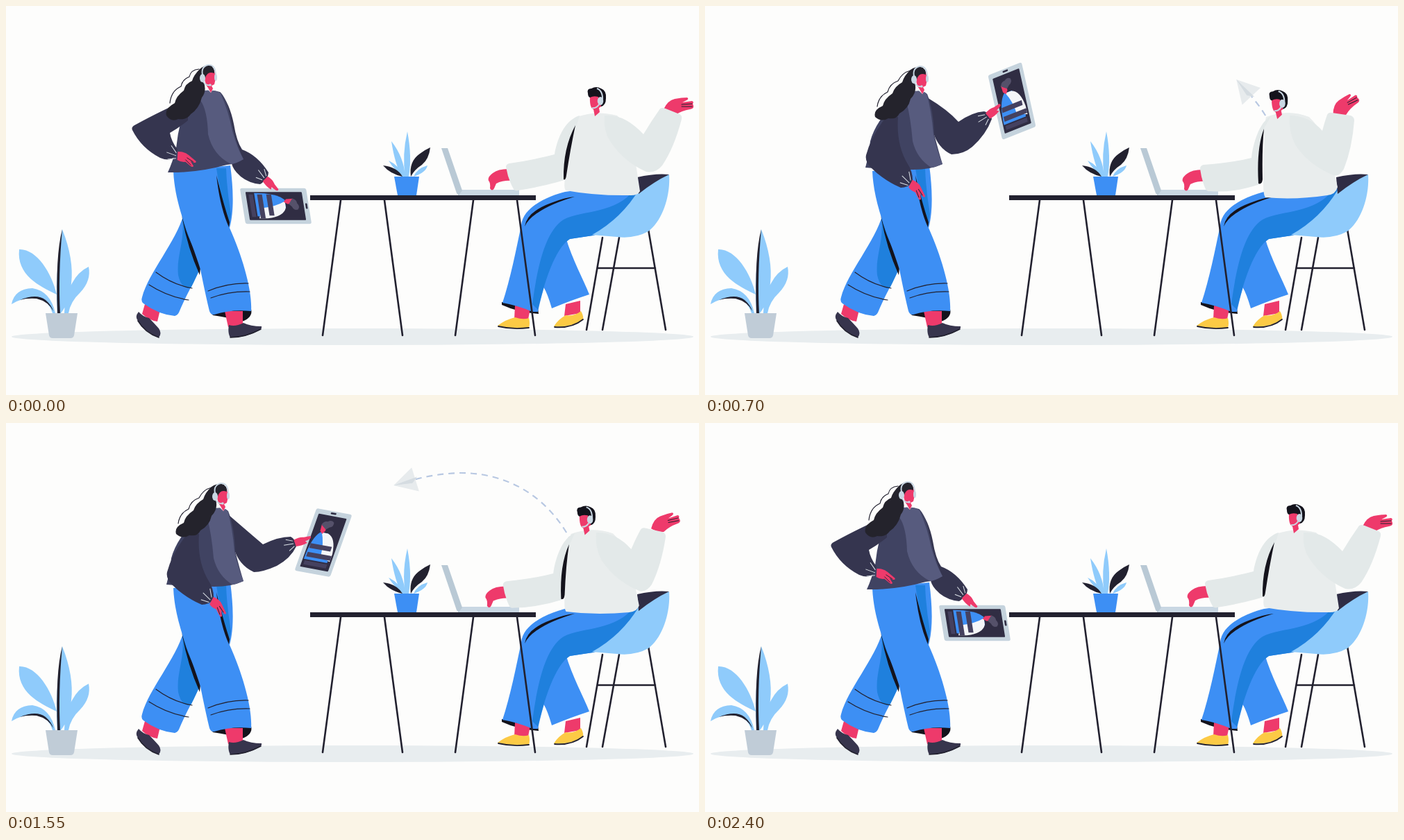
Animation of 998 by 561 pixels, one loop 2.45 s. Source, as an HTML page:

```html
<!DOCTYPE html>
<html lang="en">
<head>
<meta charset="utf-8">
<title>Sending a message</title>
<style>
  html, body { margin: 0; width: 100%; height: 100%; overflow: hidden; background: #fdfdfc; }
  svg { display: block; width: 100vw; height: 100vh; }
  .line { fill: none; stroke: #22212f; stroke-linecap: round; }
  .skin { fill: #ee3a6b; }
  .blue { fill: #3d8ff4; }
  .shade { fill: #1f80dd; }
  .leaf { fill: #8fcbfb; }
  .ink { fill: #22212f; }
  .black { fill: #14131c; }
  .knit { fill: #35354f; }
  .sleeve { fill: #e3e9e9; }
  .set { fill: #c9d7e3; }
  .wire { fill: none; stroke: #c9d7e3; }
  .pleat { fill: none; stroke: #dfe5ea; }
</style>
</head>
<body>
<svg viewBox="0 0 998 561">
  <defs><clipPath id="reveal"><rect id="flown" y="0" width="998" height="561"/></clipPath></defs>
  <ellipse cx="499" cy="477" rx="491" ry="12" fill="#e8edef"/>

  <g id="floorPlant">
    <path class="leaf" d="M81 322Q98 365 94 400Q91 428 79 443H74Q71 400 76 360Q78 338 81 322M19 351C44 350 66 385 73 416C48 404 15 388 19 351M8 430Q12 408 38 407Q64 411 71 443H67Q60 422 42 420Q22 421 8 430M119 376Q123 396 107 413Q93 426 90 443H84Q84 418 95 400Q104 383 119 376"/>
    <path class="ink" d="M81 322Q71 360 74 443H78Q75 390 81 322M20 424Q44 414 57 424Q66 432 68 440Q61 426 44 422Q30 421 20 424"/>
    <path fill="#c0ccd7" d="M57 443H103L98 475Q97 479 93 479H67Q63 479 62 475Z"/>
  </g>

  <g id="deskPlant">
    <path class="leaf" d="M578 181Q585 218 580 246H575Q570 215 578 181M555 195Q573 218 575 246H570Q560 228 555 195M607 230Q605 240 587 246Q592 234 607 230M551 223Q565 229 573 246Q560 238 551 223"/>
    <path class="ink" d="M611 204Q609 221 599 229Q588 236 583 246Q580 224 596 213Q604 207 611 204M543 230Q563 232 571 246Q553 242 543 230"/>
    <path class="blue" d="M559 246H595L591 273H564Z"/>
  </g>

  <g opacity="0" id="flight">
    <path id="trail" clip-path="url(#reveal)" fill="none" stroke="#b8c8e2" stroke-width="2.1" stroke-dasharray="9 7"
      d="M815 172C775 95 710 72 655 72C610 73 575 84 545 98C510 115 490 140 475 165"/>
    <g id="plane">
      <path fill="#e7ebed" d="M-32 0L0 -18L1 18Z"/>
      <path fill="#d5dce1" d="M-32 0L4 -3L-5 4Z"/>
    </g>
  </g>

  <g id="seated">
    <path class="line" stroke-width="2.6" d="M859 334L836 467M883 334L859 467M925 322L950 467M852 378H935"/>
    <path class="black" d="M714 427Q740 430 766 436L767 444Q738 442 714 431Z"/>
    <path class="skin" d="M733 432L755 436L752 452H732ZM806 430L827 425V443L804 447Z"/>
    <path fill="#fcca45" d="M708 461Q720 452 733 449Q745 453 753 450Q755 458 753 464Q730 466 708 461M789 462Q795 452 806 446Q818 448 828 440Q832 447 831 452Q815 464 789 462"/>
    <path class="line" stroke-width="1.8" d="M709 462Q730 467 753 464M790 463Q815 465 831 452"/>
    <path class="blue" d="M806 333C815 365 832 395 840 416Q815 424 786 436Q780 415 774 405Q785 360 806 333"/>
    <path class="blue" d="M805 268C785 273 745 288 742 316C735 350 726 395 715 428Q738 432 758 441L766 441C775 400 790 350 812 336L845 331C880 325 905 290 914 262L880 258Z"/>
    <path class="shade" d="M905 264C880 300 830 294 803 308C778 324 766 370 758 430L766 438C775 400 790 350 812 336L845 331C880 322 900 295 914 266Z"/>
    <path class="black" d="M747 318Q750 297 785 284Q805 276 819 275Q785 285 766 298Q752 307 747 318"/>
    <path class="leaf" d="M955 243C957 275 945 310 925 325Q905 336 880 333L844 330Q887 306 912 264Q930 252 955 243"/>
    <path fill="#2f2d45" d="M909 247Q935 241 955 243Q935 252 911 271Z"/>
  </g>

  <path class="set" d="M649 265H739V273H651Z"/>
  <path fill="#b9c9d5" d="M627 205H636L657 266L652 273L649 270Z"/>
  <path class="ink" d="M438 273H763V280H438Z"/>
  <path class="line" stroke-width="2.6" d="M482 280L456 475M545 280L571 475M673 280L647 475M736 280L762 475"/>

  <g id="speaker">
    <g id="typingHand"><path class="skin" d="M724 235Q708 235 701 241Q693 247 695 252Q698 255 697 263Q700 268 703 263L706 256Q716 251 730 252Z"/></g>
    <g id="openHand">
      <path class="skin" d="M-8 -3Q-2 -16 8 -18Q18 -20 26 -20Q29 -18 25 -16L19 -13L33 -15Q36 -14 34 -11L35 -8Q36 -4 30 -3Q18 -1 9 5Q0 4 -8 -3"/>
      <path class="line" stroke-width="1" d="M18 -10L33 -11M18 -7L33 -7"/>
    </g>
    <path fill="#e9eded" id="shirt"/>
    <path class="sleeve" id="typingArm"/>
    <path class="sleeve" id="openArm"/>
    <path class="black" id="fold"/>
    <g id="speakerHead">
      <path class="skin" d="M841 129Q848 126 858 130L857 145L854 147L855 153L848 159L846 149Q840 147 841 129"/>
      <path class="black" d="M838 126Q836 119 843 119Q850 115 857 119Q865 122 864 133Q864 143 857 145L853 131Q846 129 841 132Q838 131 838 126"/>
      <path class="wire" stroke-width="2" d="M851 119Q860 122 859 137M854 142Q850 148 844 147"/>
      <ellipse class="set" cx="856" cy="137" rx="4.3" ry="6"/>
    </g>
  </g>

  <g id="walker">
    <path class="black" d="M294 441L353 437Q356 449 340 455Q320 449 298 446Z"/>
    <path class="skin" d="M200 430L222 438L218 455Q205 453 196 444ZM315 440H341V461L320 463Z"/>
    <path fill="#37354d" d="M191 441Q185 448 190 454Q200 470 220 478Q225 472 220 465Q212 456 206 450Q197 448 191 441M321 460Q319 472 323 478Q345 478 362 469Q369 466 368 462Q352 462 342 457Q330 463 321 460"/>
    <path class="line" stroke-width="1.6" d="M190 454Q200 471 220 478M323 478Q345 478 367 466"/>
    <path class="blue" d="M256 300C245 340 205 385 196 420Q194 426 198 429Q220 445 243 447Q247 446 249 442C262 410 285 375 300 330Z"/>
    <path class="shade" d="M254 305C258 340 245 360 248 388Q252 408 266 407Q276 388 281 372Z"/>
    <path class="black" d="M253 301Q262 340 281 366L279 388Q260 345 253 301"/>
    <path class="blue" d="M241 238C243 290 268 340 280 380Q288 420 293 440Q295 446 300 445Q325 437 353 440C355 410 340 360 322 320C329 295 327 260 323 230Z"/>
    <path class="shade" d="M303 234H317Q318 265 324 300L321 318Q310 280 303 234"/>
    <path class="black" d="M303 244Q308 290 321 319L322 312Q313 285 303 244"/>
    <path class="line" stroke-width="1.2" d="M216 384Q240 402 268 407M206 402Q232 419 263 424M291 411Q320 399 349 400M295 421Q322 411 351 412"/>
    <path class="knit" id="frontArm"/>
    <path fill="#404362" id="sweater"/>
    <path fill="#575b7e" id="panel"/>
    <path class="knit" id="backArm"/>
    <g id="backHand">
      <path class="skin" d="M0 -6Q10 -7 16 -2L27 6Q28 9 24 8L19 6L24 13Q23 16 19 13L12 8Q5 9 0 6Z"/>
      <path class="line" stroke-width=".9" d="M14 2L23 7M12 5L20 12"/>
      <path class="pleat" d="M-2 -4L-10 -14M-2 0L-16 -4M-2 4L-14 6"/>
    </g>
    <path fill="#24232c" id="hair"/>
    <path class="line" stroke-width="1.2" id="strand"/>
    <g id="walkerHead">
      <path fill="#f5f6f7" d="M287 117L299 119L295 125Z"/>
      <path class="skin" d="M287 95Q290 91 300 93Q303 104 300 113L296 115L298 119L295 125L291 118Q284 110 287 95"/>
      <path fill="#24232c" d="M281 99Q282 86 292 86Q301 88 300 97Q290 93 287 104Z"/>
      <path class="wire" stroke-width="2" d="M284 103Q279 88 291 85Q302 84 302 101M284 109Q288 115 293 114"/>
      <ellipse class="set" cx="283" cy="104" rx="4" ry="6"/>
      <ellipse class="set" cx="302" cy="103" rx="2" ry="5"/>
      <circle class="set" cx="294" cy="114" r="1.8"/>
    </g>
    <g id="tablet">
      <rect x="-26" y="-47" width="52" height="94" rx="3" fill="#c5d3dd"/>
      <rect x="-20.5" y="-40" width="41" height="80" rx="1" fill="#302d43"/>
      <rect x="-4" y="-45" width="8" height="2.6" rx="1" fill="#302d43"/>
      <path class="blue" d="M-9 -14Q-19 -4 -19 28H15Q18 4 3 -14Z"/>
      <path fill="#f4f6f8" d="M-7 -14H2Q15 -10 18 14V26L3 20Q1 0 -7 -14"/>
      <path class="skin" d="M-11 -26H-3V-17L-6 -12L-10 -16Z"/>
      <path fill="#55516a" d="M-11 -25Q-10 -31 -4 -31Q1 -35 5 -31Q7 -25 1 -23L-3 -19Z"/>
      <path fill="#45415f" d="M-17 4H14V11H-17ZM-17 17H18V24H-17ZM-17 30H16V36H-17Z"/>
    </g>
    <g id="frontHand">
      <path class="skin" d="M-1 -5Q8 -7 14 -4L23 -3Q25 0 21 1L14 2L16 5Q8 7 -1 5Z"/>
      <path class="pleat" d="M-3 -4L-12 -9M-3 0L-17 -2M-3 4L-12 8"/>
    </g>
  </g>
</svg>
<script>
const LOOP = 2450, STEP = 50;
const $ = id => document.getElementById(id);
const NUMBER = /-?\d*\.?\d+/g;

// Cubic easing through key values that never overshoots them.
function curve(times, values) {
  const slope = i => (values[i + 1] - values[i]) / (times[i + 1] - times[i]);
  const tangents = values.map((_, i) => {
    if (!i || i === values.length - 1) return 0;
    const a = slope(i - 1), b = slope(i);
    return a * b > 0 ? 2 * a * b / (a + b) : 0;
  });
  return t => {
    if (t >= times.at(-1)) return values.at(-1);
    const i = Math.max(0, times.findLastIndex(k => k <= t));
    const h = times[i + 1] - times[i], u = Math.max(0, (t - times[i]) / h), v = 1 - u;
    return v * v * (1 + 2 * u) * values[i] + u * u * (3 - 2 * u) * values[i + 1]
      + h * u * v * (v * tangents[i] - u * tangents[i + 1]);
  };
}

const tracks = [];
function track(id, attribute, times, poses) {
  const rows = poses.map(p => p.match(NUMBER).map(Number));
  const curves = rows[0].map((_, c) => curve(times, rows.map(r => r[c])));
  const node = $(id);
  tracks.push(t => {
    let c = 0;
    node.setAttribute(attribute, poses[0].replace(NUMBER, () => curves[c++](t).toFixed(2)));
  });
}

// Poses: rest, reach, hold, return.
const walker = (id, a, b, c, d, attribute = 'd') =>
  track(id, attribute, [0, 400, 700, 1550, 1750, 2250], [a, b, c, c, d, a]);
// Poses: rest, raise, lean; leave is when the lean ends.
const speaker = (id, a, b, c, attribute = 'd', leave = 1400) =>
  track(id, attribute, [0, 400, 700, leave, 1750], [a, b, c, c, a]);
// Poses: rest, reach, lift, lower, show, return.
const holder = (id, poses, attribute = 'd') =>
  track(id, attribute, [0, 400, 700, 1100, 1550, 1750, 2250], [...poses, poses[0]]);
const place = ([x, y, angle], extra = '') => `translate(${x} ${y}) rotate(${angle})${extra}`;

walker('sweater',
  'M280 124Q295 119 308 124Q316 130 322 155Q330 195 342 221Q330 228 318 229Q275 241 233 240Q240 225 245 205Q247 185 252 165Q262 140 280 124Z',
  'M298 124Q310 120 318 126Q328 150 330 180Q335 210 340 228Q325 236 310 236Q280 238 252 236Q262 215 262 195Q262 175 266 160Q275 140 298 124Z',
  'M298 124Q310 120 320 127Q329 150 330 185Q337 212 342 228Q325 236 300 236Q265 236 231 233Q236 215 238 195Q242 180 252 165Q268 140 298 124Z',
  'M284 122Q300 119 312 124Q320 145 326 175Q332 200 341 222Q325 232 300 235Q270 239 232 238Q238 222 242 205Q245 185 254 165Q265 140 284 122Z');
walker('panel',
  'M284 122Q300 120 309 126Q320 150 326 180Q333 205 342 221Q330 228 324 228Q298 215 291 185Q290 150 280 136Z',
  'M300 124Q312 120 318 126Q326 150 328 185Q335 212 341 227Q330 233 325 233Q305 220 299 195Q296 160 292 138Z',
  'M300 124Q312 120 319 126Q326 150 329 185Q335 212 342 228Q330 233 326 233Q305 220 299 195Q296 160 290 138Z',
  'M288 121Q302 119 314 125Q320 150 325 180Q331 205 341 222Q330 228 324 229Q300 215 293 185Q290 155 282 138Z');
walker('backArm',
  'M262 135Q235 145 185 172Q180 175 182 179Q195 205 222 219Q235 224 241 219Q246 212 247 207Q238 195 236 183Q250 175 262 165Z',
  'M262 150Q235 170 217 202Q214 206 216 211Q222 240 238 261Q248 268 262 264Q268 262 269 256Q268 245 264 235Q270 190 275 160Z',
  'M265 155Q240 185 232 215Q230 225 240 234Q258 252 282 262Q292 262 299 255Q300 240 292 228Q275 200 278 160Z',
  'M262 140Q235 165 205 195Q201 200 204 204Q225 222 255 226Q268 228 274 222Q276 212 275 205Q255 195 272 155Z');
walker('backHand', ...[[247, 216, 4], [264, 264, 42], [296, 256, 28], [274, 217, 17]].map(p => place(p)), 'transform');
walker('walkerHead', 'translate(0 0)', 'translate(18 2)', 'translate(18 2)', 'translate(7 0)', 'transform');
walker('hair',
  'M297 86Q287 84 279 91Q270 100 268 108Q258 112 256 122Q245 130 243 140Q228 148 231 158Q238 168 248 163Q260 165 266 156Q278 148 282 132Q290 122 284 108Q286 96 299 96Z',
  'M314 89Q304 86 296 92Q285 100 283 112Q272 118 270 130Q258 138 257 148Q247 158 252 166Q262 172 270 165Q282 166 284 156Q296 148 297 134Q306 124 302 110Q304 98 317 98Z',
  'M314 89Q304 86 296 92Q287 100 284 110Q273 116 270 126Q258 134 256 144Q242 150 245 160Q254 168 264 162Q276 164 280 155Q293 148 296 134Q306 124 302 110Q304 98 317 98Z',
  'M305 87Q295 84 287 91Q277 98 273 108Q262 113 258 123Q247 127 243 138Q227 142 229 152Q237 160 247 155Q258 158 264 150Q280 146 288 130Q298 122 293 108Q294 96 307 96Z');
walker('strand',
  'M278 91Q266 92 264 102Q254 106 252 116Q238 122 236 140',
  'M296 93Q283 96 280 110Q268 114 265 128Q252 136 251 152',
  'M296 93Q284 96 278 108Q266 112 263 124Q250 130 248 145',
  'M286 92Q270 92 266 104Q254 108 250 116Q236 122 233 136');
holder('frontArm', [
  'M308 124Q322 140 328 170Q332 195 340 207Q362 215 378 240Q378 250 366 257Q345 255 332 240Q325 232 325 225Q310 180 300 130Z',
  'M316 126Q345 160 367 190Q395 190 415 199Q420 206 417 214Q412 222 400 226Q370 232 340 222Q330 205 326 185Q318 150 312 128Z',
  'M320 132Q350 150 365 167Q385 153 402 152Q412 154 413 163Q405 185 385 203Q372 214 355 214Q335 205 328 180Q320 155 312 128Z',
  'M320 132Q350 155 369 173Q388 158 405 157Q415 160 415 170Q405 190 385 204Q370 214 355 214Q335 205 328 180Q320 155 312 128Z',
  'M320 132Q350 158 370 175Q392 164 410 164Q418 168 418 178Q410 195 390 206Q370 215 357 215Q335 205 328 180Q320 155 312 128Z',
  'M314 126Q338 155 354 186Q380 184 402 191Q408 198 405 206Q398 214 385 219Q360 226 338 222Q330 205 324 180Q316 150 306 126Z']);
holder('frontHand', [[374, 250, 45], [417, 210, 5], [408, 158, -40], [412, 163, -30], [417, 173, -18], [404, 199, -5]]
  .map(p => place(p)), 'transform');
holder('tablet', [[388.5, 288.5, 81], [454, 230, 41], [442, 137, -21.6], [451, 151, -6.7], [457, 172.5, 10.5], [444, 202.5, 12.8]]
  .map(p => place(p, ' skewX(-9)')), 'transform');

speaker('shirt',
  'M822 160Q850 150 880 158Q905 180 905 215L913 267Q910 273 900 273Q850 274 806 266Q803 262 805 250Q806 205 820 172Z',
  'M830 158Q855 148 885 158Q905 185 905 215L914 269Q910 276 900 276Q850 274 806 266Q803 262 806 240Q815 195 830 167Z',
  'M808 160Q840 148 870 160Q895 185 900 215L911 261Q908 272 896 273Q850 280 807 276Q804 273 804 255Q806 215 805 177Z');
speaker('typingArm',
  'M826 158C803 165 793 195 790 214Q760 222 725 227Q720 228 720 232Q723 250 731 264Q733 267 737 266Q775 260 804 251Q804 210 822 172Z',
  'M830 156C810 165 802 185 797 202Q770 200 732 199Q727 199 727 203Q724 225 725 238Q726 242 731 242Q770 245 806 240Q812 205 830 167Z',
  'M815 159C798 167 789 200 787 219Q760 226 718 229Q713 230 713 235Q715 250 720 262Q722 268 727 267Q760 270 799 257Q795 210 806 175Z');
speaker('openArm',
  'M862 158Q890 155 918 185Q930 165 942 148Q945 146 950 148L970 156Q974 158 973 163Q962 205 945 230Q935 242 922 239Q890 225 870 195Q860 180 862 158Z',
  'M868 156Q900 160 912 184Q923 170 929 162Q932 159 937 161L958 168Q963 170 962 176Q955 215 938 240Q927 254 913 250Q885 230 872 195Q865 180 868 156Z',
  'M842 158Q870 158 889 180Q893 165 896 157Q898 153 903 154L930 158Q935 160 935 165Q932 205 920 235Q913 247 905 244Q870 230 850 200Q840 180 842 158Z');
speaker('fold',
  'M820 172Q802 205 803 250Q806 252 807 244Q813 205 820 172Z',
  'M831 166Q805 200 804 240Q808 242 810 234Q818 200 831 166Z',
  'M805 177Q794 205 797 256Q802 258 803 250Q802 205 805 177Z');
speaker('openHand', ...[[955, 152, 0], [944, 165, 13], [913, 156, -25]].map(p => place(p)), 'transform', 1300);
speaker('typingHand',
  'translate(0 0) rotate(0 722 245)', 'translate(3 -38) rotate(22 722 245)', 'translate(-7 1) rotate(0 722 245)', 'transform');
speaker('speakerHead',
  'translate(0 0) rotate(0 850 155)', 'translate(8 2) rotate(-10 850 155)', 'translate(-24 4) rotate(-2 850 155)', 'transform');

const trail = $('trail');
const distance = curve([600, 700, 1100, 1550, 1750, 2250], [0, 51, 176, 266, 306, 405]);

function drawFlight(t) {
  const s = distance(t), at = trail.getPointAtLength(s);
  const from = trail.getPointAtLength(Math.max(0, s - 4)), to = trail.getPointAtLength(s + 4);
  const angle = Math.atan2(from.y - to.y, from.x - to.x) * 180 / Math.PI;
  $('plane').setAttribute('transform', place([at.x, at.y, angle]));
  $('flown').setAttribute('x', at.x);
  $('flight').setAttribute('opacity', t <= 600 ? 0 : Math.max(0, Math.min(1, (2200 - t) / 250)));
}

function draw() {
  const t = Math.floor(performance.now() % LOOP / STEP) * STEP;
  tracks.forEach(update => update(t));
  drawFlight(t);
  requestAnimationFrame(draw);
}
draw();
</script>
</body>
</html>
```
